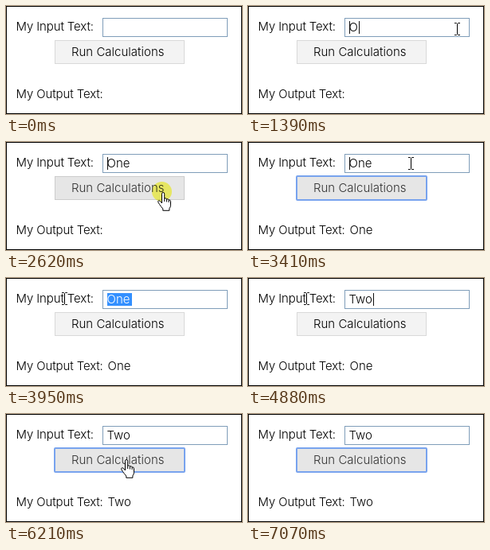
These frames come from a looping animation (296x136 px, 7530 ms). An HTML page:

```html
<!DOCTYPE html>
<html lang="en">
<head>
<meta charset="utf-8">
<title>Run Calculations</title>
<style>
  html, body { margin: 0; width: 100%; height: 100%; overflow: hidden; background: #fff; }
  svg { display: block; width: 100%; height: 100%; }
  text { font: 300 15px Inter, "Open Sans", sans-serif; fill: #000; white-space: pre; }
  .label { letter-spacing: -.12px; }
  #button rect { fill: #f3f3f3; stroke: #d9d9d9; }
  #button.hot rect { fill: #e6e6e6; stroke: #ccc; }
  #button.hot text { fill: #333; }
  #button.focus rect { stroke: #78a3ee; stroke-width: 2; }
  #click { fill: #ffff3c; opacity: .75; mix-blend-mode: multiply; }
  .caret { fill: #111; }
</style>
</head>
<body>
<svg viewBox="0 0 296 136">
  <defs>
    <clipPath id="selected"><rect id="selectedArea" y="19" width="31" height="16"/></clipPath>
    <path id="beam" d="M-3.5-7.5h2.5l1 1 1-1h2.5M0-6.5v13M-3.5 7.5h2.5l1-1 1 1h2.5" fill="none"/>
    <g id="ibeam">
      <use href="#beam" stroke="#fff" stroke-width="3"/>
      <use href="#beam" stroke="#000"/>
    </g>
    <path id="arrow" d="M.5.5v15l3.5-3.4 2.4 5.6 2.4-1-2.4-5.4h4.8z" fill="#fff" stroke="#000"/>
    <g id="hand" stroke="#000" stroke-linejoin="round" transform="translate(1 1)">
      <path d="M5.5 14V2.3q0-1.8 1.6-1.8t1.6 1.8V8q2.4-.8 2.7.9 2.3-.6 2.7 1 2.4-.2 2.4 1.9v5q0 2-1.6 4v2.5H6.8v-2.2Q4.5 18.5 2.5 15.5L.8 12.800q-.6-1.800 1-2 1.200 0 2.200 1.400z" fill="#fff"/>
      <path d="M8.7 8v4M11.4 9v3.5M14.1 10v3" fill="none"/>
    </g>
  </defs>
  <rect width="296" height="136" fill="#fff"/>
  <text class="label" x="12.500" y="31">My Input Text:</text>
  <rect x="121.500" y="15.500" width="156" height="23" fill="#fff" stroke="#7f9db9"/>
  <text id="entry" x="126.500" y="32"></text>
  <g clip-path="url(#selected)">
    <rect x="127" y="19" width="31" height="16" fill="#3390ff"/>
    <text id="entrySelected" x="126.500" y="32" style="fill:#fff"></text>
  </g>
  <rect id="startCaret" class="caret" x="127" y="19" width="1" height="16"/>
  <rect id="caret" class="caret" y="19" width="1" height="16"/>
  <g id="button">
    <rect x="61.500" y="43.500" width="162" height="29"/>
    <text x="82" y="63">Run Calculations</text>
  </g>
  <text class="label" x="12.500" y="116">My Output Text:</text>
  <text id="output" x="127.500" y="116"></text>
  <circle id="click" r="12.500"/>
  <use id="cursor"/>
  <rect x=".5" y=".5" width="295" height="135" fill="none" stroke="#000"/>
</svg>
<script>
  const LOOP = 7530;
  const $ = id => document.getElementById(id);

  // Each track lists [start time, ...values]; a value holds until the next start.
  const cursorTrack = [
    [0],
    [300, 'arrow', 288, 27], [380, 'ibeam', 273.5, 30], [450, 'ibeam', 265.5, 29], [530, 'ibeam', 262.5, 29],
    [2090, 'ibeam', 246.5, 35], [2170, 'hand', 210, 47], [2240, 'hand', 194, 57], [2320, 'hand', 189, 62],
    [2940, 'hand', 190, 59], [3020, 'hand', 192, 53], [3090, 'hand', 193, 45], [3170, 'ibeam', 200.5, 39],
    [3340, 'ibeam', 203.5, 31], [3410, 'ibeam', 204.5, 27],
    [3720, 'ibeam', 186.5, 27], [3800, 'ibeam', 146.5, 27], [3870, 'ibeam', 98.5, 26], [3950, 'ibeam', 73.5, 26],
    [5600, 'arrow', 88, 38], [5680, 'hand', 122, 51], [5750, 'hand', 143, 56],
    [6760, 'hand', 160, 56], [6840, 'hand', 198, 56], [6910, 'arrow', 236, 58], [6990, 'arrow', 276, 59],
    [7070]
  ];
  const entryTrack = [
    [0, ''], [1390, 'O', 139], [1620, 'On', 148], [1690, 'One', 157], [2090, 'One'],
    [4500, 'T', 135], [4730, 'Tw', 148], [4880, 'Two', 157], [6130, 'Two']
  ];
  const outputTrack = [[0, ''], [2790, 'One'], [6210, 'Two']];
  const buttonTrack = [
    [0, ''], [2170, 'hot'], [2790, 'hot focus'], [3720, ''], [5680, 'hot'], [6210, 'hot focus']
  ];
  const clickTrack = [
    [0], [680, 260.5, 28.5], [760], [2620, 195.5, 62.5], [2790], [6130, 149.5, 57], [6210]
  ];
  const selectionTrack = [[0, 158], [3800, 147], [3870, 127], [4500, 158]];

  const at = (track, t) => track.findLast(([start]) => start <= t).slice(1);
  const show = (node, visible) => node.setAttribute('visibility', visible ? 'visible' : 'hidden');
  const set = (node, attrs) => {
    for (const name in attrs) node.setAttribute(name, attrs[name]);
  };

  function draw(t) {
    const [shape, x, y] = at(cursorTrack, t);
    show($('cursor'), shape);
    if (shape) set($('cursor'), { href: '#' + shape, x, y });

    const [entry, caretX] = at(entryTrack, t);
    $('entry').textContent = $('entrySelected').textContent = entry;
    show($('caret'), caretX);
    if (caretX) set($('caret'), { x: caretX });
    show($('startCaret'), t >= 680 && t < 3720);

    const [left] = at(selectionTrack, t);
    set($('selectedArea'), { x: left, width: 158 - left });

    $('output').textContent = at(outputTrack, t)[0];
    const [state] = at(buttonTrack, t);
    set($('button'), { class: state });
    const grow = state.includes('focus') ? .5 : 0;
    set($('button').firstElementChild, {
      x: 61.5 - grow, y: 43.5 - grow, width: 162 + 2 * grow, height: 29 + 2 * grow, rx: 2 * grow
    });

    const [cx, cy] = at(clickTrack, t);
    show($('click'), cx);
    if (cx) set($('click'), { cx, cy });
  }

  const begin = performance.now();
  function tick() {
    draw((performance.now() - begin) % LOOP);
    requestAnimationFrame(tick);
  }
  tick();
</script>
</body>
</html>
```
